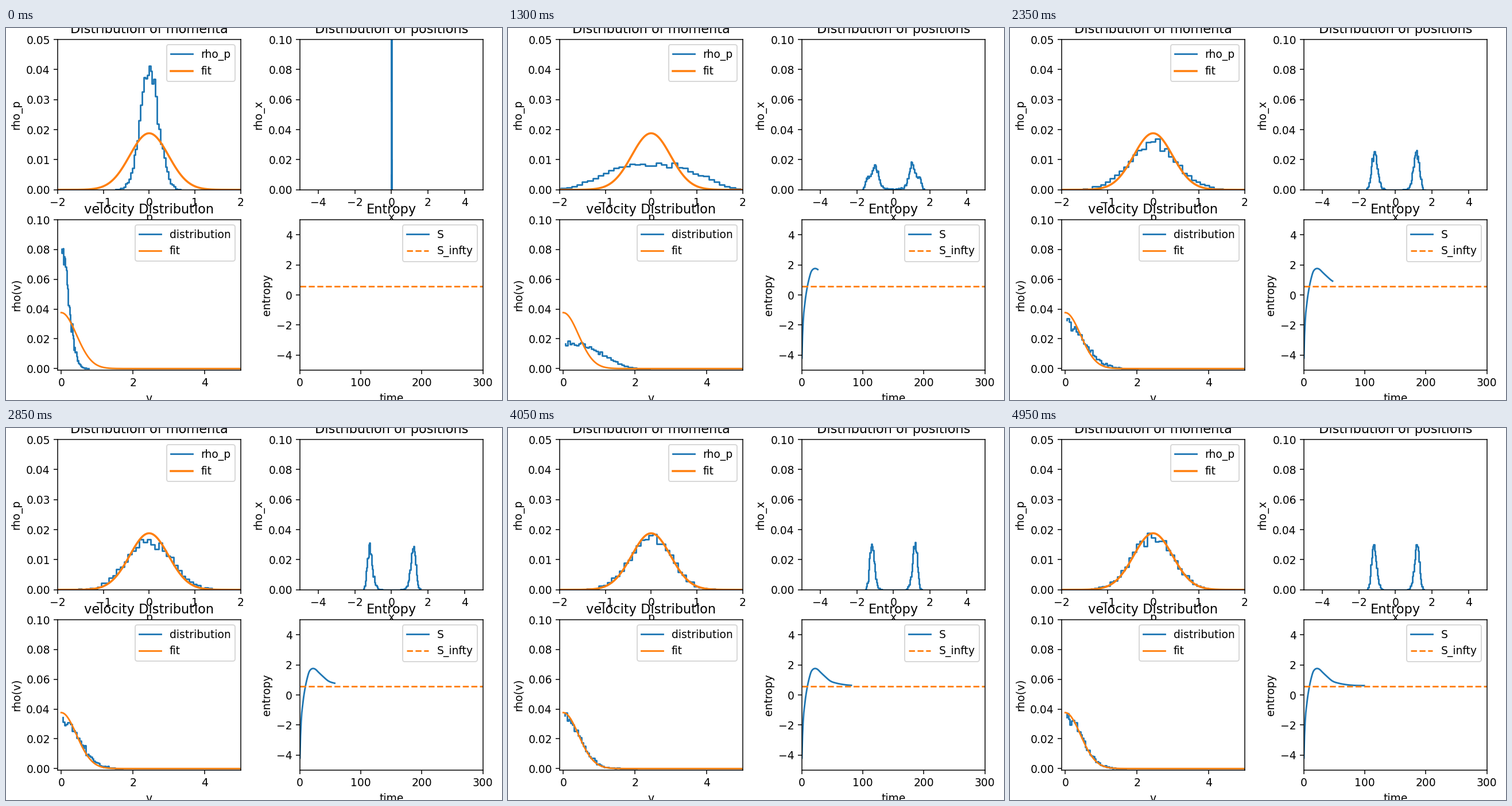
A matplotlib script for the animation above (5 s loop, 864 by 648 pixels).

```python
import numpy as np
import matplotlib.pyplot as plt
from matplotlib.animation import FuncAnimation

W, H, DPI = 864, 648, 135
FRAMES, INTERVAL = 100, 50
SCALE = 0.02          # densities are shown per bin of this width
TEMP, GAMMA, DT = 0.18, 0.9, 0.1
COUNT = 5000
S_INFTY = 0.57


def force(x):
    """Double well V = x^4 - 2.8 x^2."""
    return 5.6 * x - 4 * x**3


def simulate():
    """Langevin dynamics of particles released on top of the barrier."""
    rng = np.random.default_rng(4)
    x = rng.normal(0, 0.0044, COUNT)
    p = rng.normal(0, 0.2, COUNT)
    kick = np.sqrt(2 * GAMMA * TEMP * DT)
    states = [(x, p)]
    for _ in range(FRAMES - 1):
        p = p + (force(x) - GAMMA * p) * DT + kick * rng.standard_normal(COUNT)
        x = x + p * DT
        states.append((x, p))
    return states


def smooth_curve(t, knots, values):
    """Cubic Hermite interpolation through a few points."""
    slopes = np.gradient(values, knots)
    i = np.clip(np.searchsorted(knots, t, side="right") - 1, 0, len(knots) - 2)
    h = knots[i + 1] - knots[i]
    u = (t - knots[i]) / h
    return ((1 + 2 * u) * (1 - u)**2 * values[i] + u * (1 - u)**2 * h * slopes[i]
            + u**2 * (3 - 2 * u) * values[i + 1] + u**2 * (u - 1) * h * slopes[i + 1])


def gauss(p):
    return SCALE * np.exp(-p**2 / (2 * TEMP)) / np.sqrt(2 * np.pi * TEMP)


def set_hist(line, data, bins):
    density, edges = np.histogram(data, bins=bins, density=True)
    line.set_data(edges[1:], density * SCALE)


def panel(left, top, title, xlabel, ylabel, xlim, ylim):
    width, height = 318.6, 261.8
    ax = fig.add_axes([left / W, 1 - (top + height) / H, width / W, height / H])
    ax.set(title=title, xlabel=xlabel, ylabel=ylabel, xlim=xlim, ylim=ylim)
    return ax


states = simulate()
times = np.arange(FRAMES + 1)
entropy = smooth_curve(
    times,
    np.array([0, 1, 2, 5, 9, 12, 15, 18, 22, 26, 30, 37, 47, 57, 67, 81, 100]),
    np.array([-4.2, -2.7, -1.8, -0.5, 0.57, 1.12, 1.53, 1.7, 1.76, 1.69, 1.53,
              1.26, 0.92, 0.78, 0.7, 0.64, 0.62]))

plt.rcParams["font.family"] = "DejaVu Sans"
fig = plt.figure(figsize=(W / DPI, H / DPI), dpi=DPI)

ax_p = panel(90, 20, "Distribution of momenta", "p", "rho_p", (-2, 2), (0, 0.05))
ax_x = panel(512, 20, "Distribution of positions", "x", "rho_x", (-5, 5), (0, 0.1))
ax_v = panel(90, 334.1, "velocity Distribution", "v", "rho(v)", (-0.1, 5), (-0.001, 0.1))
ax_s = panel(512, 334.1, "Entropy", "time", "entropy", (0, 300), (-5, 5))

line_p, = ax_p.plot([], [], drawstyle="steps", label="rho_p")
grid = np.linspace(-2, 2, 300)
ax_p.plot(grid, gauss(grid), lw=1.9, label="fit")

line_x, = ax_x.plot([], [], drawstyle="steps")

line_v, = ax_v.plot([], [], drawstyle="steps", label="distribution")
grid = np.linspace(0, 5, 300)
ax_v.plot(grid, 2 * gauss(grid), label="fit")

line_s, = ax_s.plot([], [], label="S")
ax_s.plot([0, 300], [S_INFTY, S_INFTY], "--", label="S_infty")

for ax in (ax_p, ax_v, ax_s):
    ax.legend(loc="upper right")


def update(n):
    x, p = states[n]
    set_hist(line_p, p, 40)
    set_hist(line_x, x, 80)
    set_hist(line_v, np.abs(p), 40)
    line_s.set_data(times[:n + 1], entropy[:n + 1])
    return line_p, line_x, line_v, line_s


anim = FuncAnimation(fig, update, frames=FRAMES, interval=INTERVAL,
                     repeat=True, repeat_delay=0)
plt.show()
```
